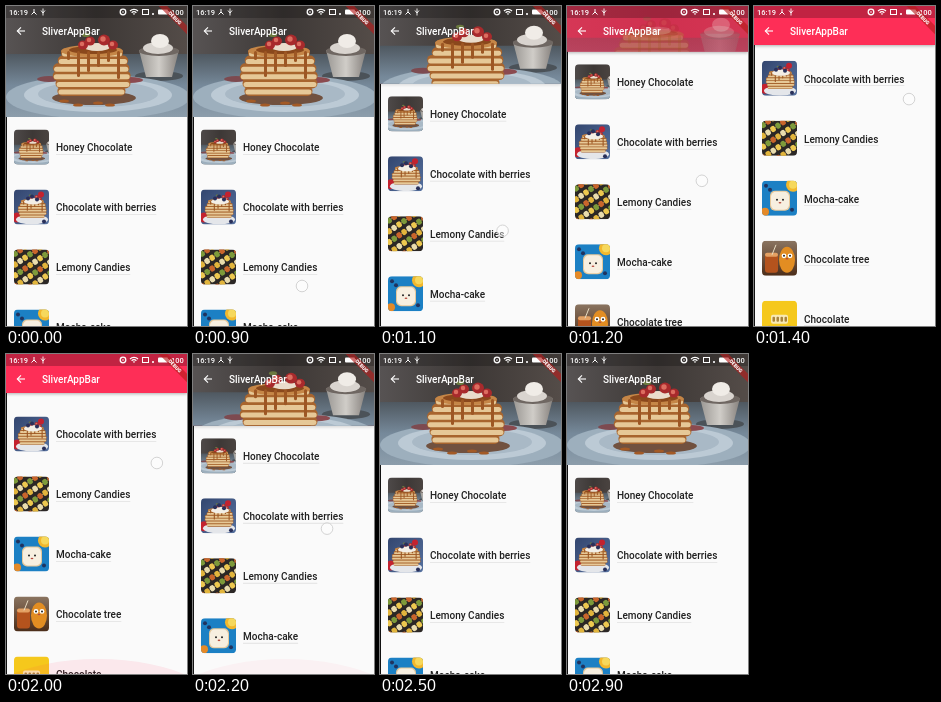
Recreate the animation shown at these times as an HTML page with a canvas. Size 181 px wide and 320 px high, loop 3000 ms.

```html
<!DOCTYPE html>
<html lang="en">
<head>
<meta charset="utf-8">
<title>SliverAppBar</title>
<style>
html, body { margin: 0; width: 100%; height: 100%; overflow: hidden; background: #fafafa; }
canvas { display: block; width: 181px; height: 320px; }
</style>
</head>
<body>
<canvas></canvas>
<script>
const W = 181, H = 320, LOOP = 3000, STEP = 100;
const BAR_MAX = 111, BAR_MIN = 39, SCROLL_MAX = 151, ROW = 60;
const PINK = '#fe2e57';

const canvas = document.querySelector('canvas');
const c = canvas.getContext('2d');
const scale = window.devicePixelRatio || 1;
canvas.width = W * scale;
canvas.height = H * scale;

const clamp = v => Math.min(1, Math.max(0, v));
const ramp = (t, from, to) => clamp((t - from) / (to - from));
const ease = (t, from, to) => { const u = ramp(t, from, to); return u * u * (3 - 2 * u); };

function rect(color, x, y, w, h, r = 0) {
  c.fillStyle = color;
  c.beginPath();
  c.roundRect(x, y, w, h, r);
  c.fill();
}

function oval(color, x, y, rx, ry = rx) {
  c.fillStyle = color;
  c.beginPath();
  c.ellipse(x, y, rx, ry, 0, 0, 7);
  c.fill();
}

function polygon(color, ...p) {
  c.fillStyle = color;
  c.beginPath();
  for (let i = 0; i < p.length; i += 2) c.lineTo(p[i], p[i + 1]);
  c.fill();
}

function line(color, width, ...p) {
  c.strokeStyle = color;
  c.lineWidth = width;
  c.beginPath();
  for (let i = 0; i < p.length; i += 2) c.lineTo(p[i], p[i + 1]);
  c.stroke();
}

function text(s, x, y, color, size = 10, weight = 500) {
  c.font = `${weight} ${size}px Roboto, sans-serif`;
  c.fillStyle = color;
  c.fillText(s, x, y);
}

function fade(x0, y0, x1, y1, ...colors) {
  const g = c.createLinearGradient(x0, y0, x1, y1);
  colors.forEach((color, i) => g.addColorStop(i / (colors.length - 1), color));
  return g;
}

// Runs draw() with saved state, moved to x, y and scaled
function at(x, y, k, draw) {
  c.save();
  c.translate(x, y);
  c.scale(k, k);
  draw();
  c.restore();
}

function pancakes() {
  for (let i = 5; i >= 0; i--) {
    const y = 42 + i * 7.6, half = 31 + 8 * Math.sin(i * 0.55), x = 86 + Math.sin(i * 2);
    rect('#a8652e', x - half, y, half * 2, 10, 5);
    rect('#e6c897', x - half + 1, y + 3.5, half * 2 - 2, 5, 2.5);
  }
  oval('#c58647', 86, 45, 31, 6);
  oval('#8a481c', 87, 44, 24, 4);
  for (let i = 0; i < 6; i++) rect('#9d5724', 61 + i * 10, 45, 3, 9 + (i * 17) % 22, 1.5);
  oval('#eadccb', 91, 41, 13, 4);
  [[77, 39, 5], [84, 35, 5], [98, 34, 6], [107, 39, 5]].forEach(([x, y, r]) => {
    oval('#a82a2c', x, y, r, r * 0.9);
    oval('#dc6d60', x - 1, y - 1, r * 0.45);
  });
  oval('#6b7a3f', 80, 29, 4, 2);
}

function headerPhoto() {
  rect(fade(0, 0, W, 0, '#575353', '#3d3836', '#544c48'), 0, 0, W, BAR_MAX);
  rect(fade(0, 48, 0, BAR_MAX, '#4f5860', '#76899a', '#8c9dab'), 0, 48, W, BAR_MAX - 48);
  oval('#4b5258', 153, 70, 24, 5);
  polygon(fade(133, 0, 173, 0, '#9a9793', '#d0cdc8', '#86817d'), 133, 44, 173, 44, 166, 71, 140, 71);
  oval('#6f6762', 153, 45, 20, 5);
  oval('#d9d4cf', 152, 42, 15, 6);
  oval('#f0ece7', 154, 35, 9, 7);
  oval('#9dafbd', 92, 91, 92, 22);
  oval('#bccad5', 92, 89, 74, 17);
  oval('#a9b9c6', 92, 88, 60, 13);
  oval('#8b4a4f', 124, 74, 13, 3);
  oval('#7d4a50', 43, 73, 12, 3);
  oval('#71513f', 88, 92, 42, 7);
  pancakes();
  [[58, 95], [72, 99], [92, 97], [104, 99]].forEach(([x, y]) => oval('#a35a26', x, y, 5, 1.6));
}

const face = (x, y) => {
  oval('#222', x - 3, y, 1);
  oval('#222', x + 3, y, 1);
  oval('#b5483c', x, y + 3, 1.4, 0.8);
};

// Thumbnails are painted in a 35 by 35 box
const rows = [
  ['Honey Chocolate', () => at(-10, 0, 0.316, headerPhoto)],
  ['Chocolate with berries', () => {
    rect(fade(0, 0, 35, 35, '#33466f', '#56719f'), 0, 0, 35, 35);
    oval('#c3222f', 3, 28, 5);
    oval('#e4e6ea', 18, 30, 16, 5);
    at(-13.5, -5, 0.37, pancakes);
    oval('#f3eee6', 19, 12, 9, 3);
    [[14, 9], [18, 7], [23, 10], [30, 32]].forEach(([x, y]) => oval('#29305a', x, y, 2));
    oval('#c3222f', 27, 5, 3);
  }],
  ['Lemony Candies', () => {
    rect('#2b2725', 0, 0, 35, 35);
    c.rotate(-0.6);
    const colors = ['#e2b53c', '#7d9a3a', '#e9dcae', '#c9652b', '#edc84f'];
    for (let j = 0; j < 5; j++) {
      const y = j * 9 + 1;
      line('#b99a62', 0.8, -22, y + 3, 32, y + 3);
      for (let i = 0; i < 9; i++) rect(colors[(i * 2 + j) % 5], i * 6 - 22, y, 5, 6, 2);
    }
  }],
  ['Mocha-cake', () => {
    rect('#1c80c4', 0, 0, 35, 35);
    oval('#f2b72c', 31, 4, 7);
    oval('#f6d85c', 31, 4, 4);
    oval('#e58a28', 3, 31, 4);
    [[4, 5], [8, 9], [30, 29]].forEach(([x, y]) => oval('#20335f', x, y, 2));
    rect('#e6c89b', 8, 10, 20, 20, 5);
    rect('#f7efe0', 9, 11, 18, 18, 5);
    face(18, 19);
  }],
  ['Chocolate tree', () => {
    rect(fade(0, 0, 0, 35, '#8a7460', '#4c2d19'), 0, 0, 35, 35);
    rect('#b4531d', 3, 13, 13, 19, 3);
    rect('#e4a163', 3, 12, 13, 4, 2);
    line('#e8dcc2', 1, 10, 14, 14, 4);
    oval('#e28d22', 25, 19, 8, 13);
    oval('#fff', 22, 15, 2.4);
    oval('#fff', 28, 15, 2.4);
    face(25, 15);
  }],
  ['Chocolate', () => {
    rect('#f5c81c', 0, 0, 35, 35);
    rect('#f8e9b4', 9, 14, 17, 9, 2);
    for (let i = 0; i < 4; i++) rect('#a8833a', 10.5 + i * 4, 16, 2.5, 5, 1);
    line('#8d7432', 0.8, 7, 25, 7, 32);
    line('#8d7432', 0.8, 28, 25, 28, 32);
  }]
];

function drawRow([name, thumb], y) {
  c.save();
  c.translate(8, y - 17.5);
  c.beginPath();
  c.roundRect(0, 0, 35, 35, 4);
  c.clip();
  thumb();
  c.restore();
  text(name, 50, y + 1.5, '#202020');
  rect('#e0e0e0', 50, y + 7, c.measureText(name).width, 0.8);
}

function statusBar() {
  rect('rgba(0,0,0,.24)', 0, 0, W, 12);
  text('16:19', 3, 6.5, '#fff', 7.5);
  line('#fff', 1, 28, 3, 28, 6, 25.5, 8.5);
  line('#fff', 1, 28, 6, 30.5, 8.5);
  line('#fff', 0.9, 37, 9.5, 37, 2.5);
  line('#fff', 0.9, 35, 4.5, 37, 7, 39, 4.5);
  c.strokeStyle = '#fff';
  c.lineWidth = 1.3;
  c.beginPath();
  c.arc(117, 6, 2.8, 0, 7);
  c.stroke();
  oval('#fff', 117, 6, 0.8);
  for (let r = 1; r < 7; r += 2.3) {
    c.beginPath();
    c.arc(128, 9, r, -Math.PI * 0.75, -Math.PI * 0.25);
    c.stroke();
  }
  c.lineWidth = 1;
  c.strokeRect(136.5, 3.5, 6, 5);
  line('#fff', 0.8, 146, 7, 148, 9);
  line('#fff', 0.8, 148, 7, 146, 9);
  rect('#fff', 152, 3.5, 10, 5, 1);
  rect('#fff', 162, 5, 1.2, 2);
  text('100', 165, 6.5, '#fff', 7.5);
}

function debugBanner() {
  at(W, 0, 1, () => {
    c.rotate(Math.PI / 4);
    rect('rgba(183,28,28,.63)', -20, 14, 40, 6);
    c.textAlign = 'center';
    text('DEBUG', 0, 17.3, '#fff', 5.1, 900);
  });
}

function appBar(scroll) {
  const height = Math.max(BAR_MIN, BAR_MAX - scroll);
  const range = BAR_MAX - BAR_MIN, collapse = clamp(scroll / range);
  c.save();
  c.shadowColor = `rgba(0,0,0,${0.3 * collapse})`;
  c.shadowBlur = 3 * scale;
  c.shadowOffsetY = scale;
  rect(PINK, 0, 0, W, height);
  c.restore();
  c.save();
  c.beginPath();
  c.rect(0, 0, W, height);
  c.clip();
  c.globalAlpha = 1 - ramp(collapse, 1 - 28 / range, 1);
  // The photo moves at a quarter of the scroll speed
  if (c.globalAlpha > 0) at(0, -collapse * range / 4, 1, headerPhoto);
  c.restore();
  line('#fff', 1.1, 19, 25, 11.5, 25);
  line('#fff', 1.1, 15, 21.3, 11.3, 25, 15, 28.7);
  text('SliverAppBar', 36, 26, '#fff');
  statusBar();
  debugBanner();
}

function touch(t, back) {
  if (t < 900 || t > 2400) return;
  const up = ease(t, 900, 1470);
  const x = 109 + 48 * up - 31 * back, y = 280 - 195 * up + 121 * back;
  oval('rgba(255,255,255,.45)', x, y, 5.8);
  c.strokeStyle = '#cecece';
  c.lineWidth = 0.9;
  c.stroke();
}

function draw(t) {
  const back = ease(t, 1850, 2375);
  const scroll = SCROLL_MAX * (ease(t, 900, 1560) - back);
  c.setTransform(scale, 0, 0, scale, 0, 0);
  c.textBaseline = 'middle';
  rect('#fafafa', 0, 0, W, H);
  rows.forEach((row, i) => drawRow(row, 141 + i * ROW - scroll));
  const glow = ramp(t, 1400, 1650) * (1 - ramp(t, 1850, 2350));
  oval(`rgba(254,46,87,${0.13 * glow})`, 92, 371, 135, 66);
  rect('#111', 0, 0, 1, H);
  appBar(scroll);
  touch(t, back);
}

function tick(now) {
  draw(Math.floor(now % LOOP / STEP) * STEP);
  requestAnimationFrame(tick);
}
requestAnimationFrame(tick);
</script>
</body>
</html>
```
